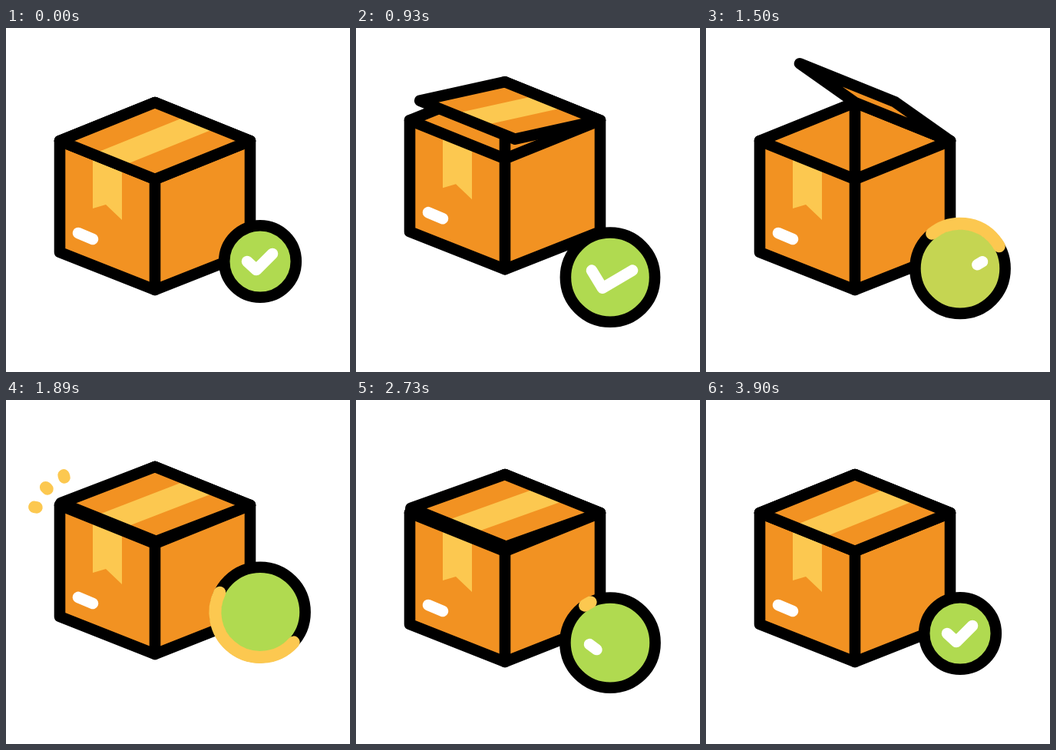
An HTML page with a canvas for the animation above (4500 ms loop, 448 by 448 pixels).

```html
<!DOCTYPE html>
<html lang="en">
<head>
<meta charset="utf-8">
<title>Package delivered</title>
<style>
  html, body { margin: 0; width: 100%; height: 100%; overflow: hidden; background: #fff; }
  canvas { display: block; }
</style>
</head>
<body>
<canvas id="stage" width="448" height="448"></canvas>
<script>
const ctx = document.getElementById('stage').getContext('2d');
const ORANGE = '#f29222', YELLOW = '#fcc850', BLACK = '#000', WHITE = '#fff';
const LOOP = 4500, STEP = 30, LINE = 14.6;

const progress = (t, from, to) => Math.min(1, Math.max(0, (t - from) / (to - from)));
const ease = (t, from, to) => (1 - Math.cos(Math.PI * progress(t, from, to))) / 2;
// Rises from a to b, holds, falls from c to d
const pulse = (t, a, b, c, d) => ease(t, a, b) - ease(t, c, d);
// Positive amounts start fast, negative ones start slow
const bend = (u, amount) => u * (1 + amount * (1 - u));
const mix = (a, b, p) => Array.isArray(a) ? a.map((v, i) => mix(v, b[i], p)) : a + (b - a) * p;

function trace(points, closed) {
  ctx.beginPath();
  points.forEach(([x, y]) => ctx.lineTo(x, y));
  if (closed) ctx.closePath();
}

function fill(points, color) {
  trace(points, true);
  ctx.fillStyle = color;
  ctx.fill();
}

function paintLine(color, width) {
  ctx.strokeStyle = color;
  ctx.lineWidth = width;
  ctx.stroke();
}

function stroke(points, color, closed = false, width = LINE) {
  trace(points, closed);
  paintLine(color, width);
}

// Strokes only the part of a polyline between two fractions of its length
function strokePart(points, from, to, color) {
  if (to - from < 0.001) return;
  let length = 0;
  for (let i = 1; i < points.length; i++)
    length += Math.hypot(points[i][0] - points[i - 1][0], points[i][1] - points[i - 1][1]);
  ctx.setLineDash([length * (to - from), 999]);
  ctx.lineDashOffset = -length * from;
  stroke(points, color);
  ctx.setLineDash([]);
}

const BACK = [194, 97], LEFT = [70, 147], RIGHT = [318, 147], FRONT = [194, 197], FOOT = [194, 341];
const OUTLINE = [BACK, RIGHT, [318, 292], FOOT, [70, 292], LEFT];

function drawLid(t) {
  const wide = pulse(t, 750, 1340, 1340, 1950), small = pulse(t, 2070, 2400, 2400, 2820);
  const rx = -124 + 62 * wide + 12 * small;
  const ry = 50 - 120 * wide - 56 * small;
  const at = (along, reach) => [BACK[0] + 124 * along + rx * reach, BACK[1] + 50 * along + ry * reach];
  const panel = (from, to) => [at(from, 0), at(to, 0), at(to, 1), at(from, 1)];
  const topVisible = rx * 50 < ry * 124;

  fill(panel(0, 1), ORANGE);
  if (topVisible) fill(panel(0.347, 0.653), YELLOW);
  stroke(panel(0, 1), BLACK, true);
}

function drawSparks(t) {
  if (t < 1860 || t >= 2510) return;
  const head = 30 * bend(progress(t, 1860, 2400), 1);
  const tail = 30 * bend(progress(t, 1890, 2510), -1);
  for (const [x, y, degrees] of [[76, 111, 253], [54, 126, 224], [40, 150, 190]]) {
    const angle = degrees * Math.PI / 180;
    const at = d => [x + d * Math.cos(angle), y + d * Math.sin(angle)];
    stroke([at(tail), at(head)], YELLOW, false, 15.5);
  }
}

function drawBox(t) {
  const hop = start => pulse(t, start, start + 570, start + 570, start + 1140);
  ctx.save();
  ctx.translate(0, -27 * hop(330) - 13 * hop(1500));
  fill(OUTLINE, ORANGE);
  stroke([BACK, FRONT], BLACK);
  fill([[113, 160], [151, 176], [151, 250], [130, 230], [113, 235]], YELLOW);
  stroke([[94, 267], [113, 275]], WHITE);
  stroke(OUTLINE, BLACK, true);
  stroke([LEFT, FRONT, RIGHT], BLACK);
  stroke([FRONT, FOOT], BLACK);
  drawLid(t);
  drawSparks(t);
  ctx.restore();
}

const CHECK = [[-17, 0], [-5, 11], [16, -10]];
const CHECK_LEAVING = [[-24, -9], [-10, 14], [29, -9]];
const CHECK_ARRIVING = [[-27, 2], [-8, 16], [29, -14]];

function ring(radius, from, to, color, width) {
  ctx.beginPath();
  ctx.arc(0, 0, radius, from * Math.PI / 180, to * Math.PI / 180);
  paintLine(color, width);
}

function drawBadge(t) {
  const radius = 46.8 + 11.8 * pulse(t, 330, 1020, 3200, 3890);
  const drop = 26.5 * pulse(t, 330, 1200, 3010, 3900) - 60 * pulse(t, 1180, 2070, 2150, 3010);
  const glow = t > 1300 && t < 2440 ? Math.max(0, Math.cos((t - 1500) / 750 * 2 * Math.PI)) : 0;
  ctx.save();
  ctx.translate(331, 304 + drop);
  ctx.beginPath();
  ctx.arc(0, 0, radius, 0, 2 * Math.PI);
  ctx.fillStyle = `rgb(${mix([176, 218, 80], [197, 213, 82], glow).map(Math.round)})`;
  ctx.fill();
  ring(radius, 0, 360, BLACK, LINE);

  // The yellow arc makes about two turns, its tail chasing its head
  const head = -129 + 741 * bend(progress(t, 1350, 2750), 0.28);
  const tail = -129 + 741 * bend(progress(t, 1500, 2750), -0.38);
  if (head > tail) ring(radius, tail, head, YELLOW, 16);

  const leaving = t < 2100;
  const shape = mix(CHECK, leaving ? CHECK_LEAVING : CHECK_ARRIVING, pulse(t, 330, 930, 2730, 3890));
  if (leaving) strokePart(shape, ease(t, 1130, 1600), 1, WHITE);
  else strokePart(shape, 0, ease(t, 2600, 3090), WHITE);
  ctx.restore();
}

function render(now) {
  const t = Math.floor(now % LOOP / STEP) * STEP;
  ctx.fillStyle = WHITE;
  ctx.fillRect(0, 0, 448, 448);
  ctx.lineCap = ctx.lineJoin = 'round';
  drawBox(t);
  drawBadge(t);
}

const start = performance.now();
function tick() {
  render(performance.now() - start);
  requestAnimationFrame(tick);
}
tick();
</script>
</body>
</html>
```
